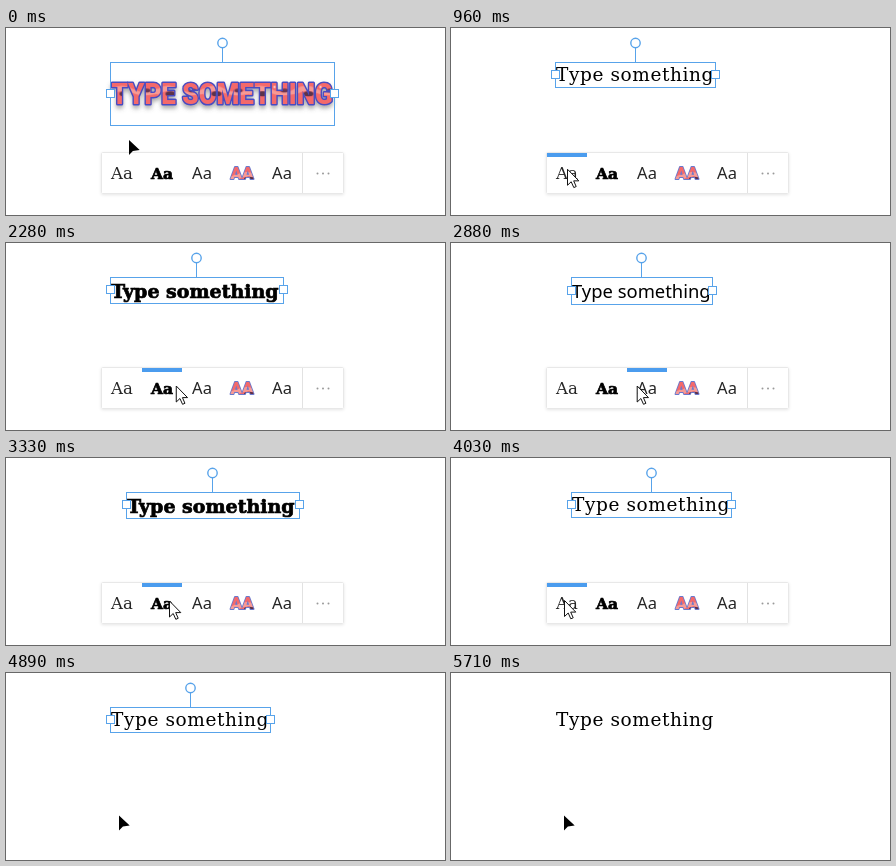
Recreate the animation shown at these times as an HTML page. Size 439 px wide and 187 px high, loop 7260 ms.

```html
<!DOCTYPE html>
<html lang="en">
<head>
<meta charset="utf-8">
<title>Text style picker</title>
<style>
  html, body { margin: 0; width: 100%; height: 100%; overflow: hidden; background: #fff; }
  svg { display: block; width: 100vw; height: 100vh; }
  text { white-space: pre; }
  .serif { font: 18.5px "DejaVu Serif", serif; letter-spacing: .6px; }
  .fat { font: bold 19px "DejaVu Serif", serif; stroke: #000; stroke-width: .7; }
  .sans { font: 18.4px "Noto Sans", sans-serif; }
  .art { font: 900 26px Roboto, sans-serif; fill: url(#lava); stroke: #4a4cc0; stroke-width: 2.8; stroke-linejoin: round; paint-order: stroke; }
  #items text { text-anchor: middle; fill: #262626; }
  #items .serif { font-size: 16.5px; letter-spacing: 0; }
  #items .fat { font-size: 15.5px; fill: #000; }
  #items .sans { font-size: 16.5px; }
  #items .art { font-size: 17px; fill: url(#lava); stroke: #6a78cc; stroke-width: 1.8; }
  #select { fill: #fff; stroke: #58a3ea; }
  #frame { fill: none; }
</style>
</head>
<body>
<svg viewBox="0 0 439 187">
  <defs>
    <pattern id="lava" width="46" height="40" patternUnits="userSpaceOnUse">
      <rect width="46" height="40" fill="#f4696a"/>
      <path d="M0 27Q10 21 22 27T46 26V31Q30 34 20 30T0 32Z" fill="#f79a94"/>
      <path d="M0 14Q12 19 24 14T46 15V19Q30 22 18 19T0 19Z" fill="#ee5350"/>
      <ellipse cx="13" cy="31" rx="5" ry="2.2" fill="#5b3048"/>
      <ellipse cx="35" cy="28" rx="4" ry="1.8" fill="#6d3550"/>
      <circle cx="25" cy="25" r="1" fill="#ffe3dc"/>
    </pattern>
    <filter id="drop" x="-10%" y="-30%" width="120%" height="180%">
      <feDropShadow dx="0" dy="3" stdDeviation="2" flood-color="#555" flood-opacity=".5"/>
    </filter>
    <filter id="soft" x="-5%" y="-20%" width="110%" height="150%">
      <feDropShadow dx="0" dy="1" stdDeviation="1.5" flood-color="#000" flood-opacity=".1"/>
    </filter>
  </defs>

  <text id="label">Type something</text>
  <g id="art" filter="url(#drop)">
    <text class="art" transform="translate(105.5 76) scale(1 1.13)">TYPE SOMETHING</text>
  </g>

  <g id="select">
    <rect id="frame"/>
    <path id="stem"/>
    <circle id="knob" cy="15" r="4.7" stroke-width="1.4"/>
    <rect id="left" width="8" height="8"/>
    <rect id="right" width="8" height="8"/>
  </g>

  <g id="panel">
    <rect x="95.5" y="124.5" width="242" height="41" rx="1" fill="#fff" stroke="#e8e8e8" filter="url(#soft)"/>
    <path d="M296.5 125V165" stroke="#e2e2e2"/>
    <rect id="bar" y="125" width="40" height="4" fill="#4b9cee"/>
    <g id="items">
      <text class="serif" x="116" y="151">Aa</text>
      <text class="fat" x="156" y="151">Aa</text>
      <text class="sans" x="196" y="151">Aa</text>
      <text class="art" x="236" y="151">AA</text>
      <text class="sans" x="276" y="151">Aa</text>
    </g>
    <g fill="#999">
      <circle cx="311.5" cy="145.5" r="1"/>
      <circle cx="317" cy="145.5" r="1"/>
      <circle cx="322.5" cy="145.5" r="1"/>
    </g>
  </g>

  <g id="cursor">
    <path id="solid" d="M.5 .5V15.5L4.4 11.5L11.2 10.4Z"/>
    <path id="hollow" d="M0 0V16L3.7 12.5L6.3 18.3L8.7 17.3L6.2 11.6H11.3Z" fill="#fff" stroke="#111"/>
  </g>
</svg>
<script>
const LOOP = 7260, OPEN = 960, CLOSE = 4530, DESELECT = 5710;
const $ = id => document.getElementById(id);
const set = (id, attrs) => {
  for (const key in attrs) $(id).setAttribute(key, attrs[key]);
};
const show = (id, on) => set(id, { visibility: on ? "visible" : "hidden" });

// start, end, steps, target x, target y
const moves = [
  [660, 780, 3, 116.5, 140.5],
  [960, 1030, 2, 116.5, 142],
  [1340, 1540, 4, 149.5, 142.5],
  [1920, 1920, 1, 149.5, 143],
  [2100, 2460, 6, 191, 143],
  [2880, 3130, 5, 167, 143],
  [3280, 3330, 2, 163.5, 143],
  [3640, 4030, 7, 113.5, 142.5],
  [4530, 4890, 5, 112.5, 142]
];

const styles = [
  { name: "serif", width: 160, height: 25, base: 53 },
  { name: "fat", width: 173, height: 26, base: 55 },
  { name: "sans", width: 141, height: 27, base: 55 }
];
const art = { width: 224, height: 63 };

function stepped(t, start, end, steps) {
  if (t < start) return 0;
  if (t >= end) return 1;
  return (Math.floor((t - start) / (end - start) * (steps - 1)) + 1) / steps;
}

function pointer(t) {
  let x = 122.5, y = 111.5;
  for (const [start, end, steps, tx, ty] of moves) {
    const p = stepped(t, start, end, steps);
    x += (tx - x) * p;
    y += (ty - y) * p;
  }
  return { x, y };
}

function drawSelection(left, { width, height }) {
  const x = left + .5, y = 34.5;
  const mid = Math.floor(left + width / 2) + .5;
  const side = Math.floor(y + height / 2) - 4.5;
  set("frame", { x, y, width, height });
  set("stem", { d: `M${mid} 20V34` });
  set("knob", { cx: mid });
  set("left", { x: x - 4, y: side });
  set("right", { x: x + width - 4, y: side });
}

let shiftAt = 0;
function draw(t) {
  const { x, y } = pointer(t);
  const styled = t >= OPEN;
  const hovering = styled && t < CLOSE;
  const hover = hovering ? Math.floor((x - 96) / 40) : 0;
  const style = styled ? styles[hover] : art;
  const left = hovering && t >= shiftAt ? 120 : 104;
  const fade = 1 - stepped(t, 4530, 4890, 5);

  show("art", !styled);
  show("label", styled);
  if (styled) set("label", { class: style.name, x: left + 1, y: style.base });

  show("select", t < DESELECT);
  drawSelection(left, style);

  set("panel", { opacity: fade });
  show("bar", styled);
  set("bar", { x: 96 + hover * 40 });

  const over = y > 125 && fade > 0;
  show("solid", !over);
  show("hollow", over);
  set("cursor", { transform: `translate(${x} ${y})` });
}

// the label recentres when the pointer first reaches the third style
while (pointer(shiftAt).x < 176) shiftAt += 4;

const begin = performance.now();
function tick() {
  draw((performance.now() - begin) % LOOP);
  requestAnimationFrame(tick);
}
tick();
</script>
</body>
</html>
```
